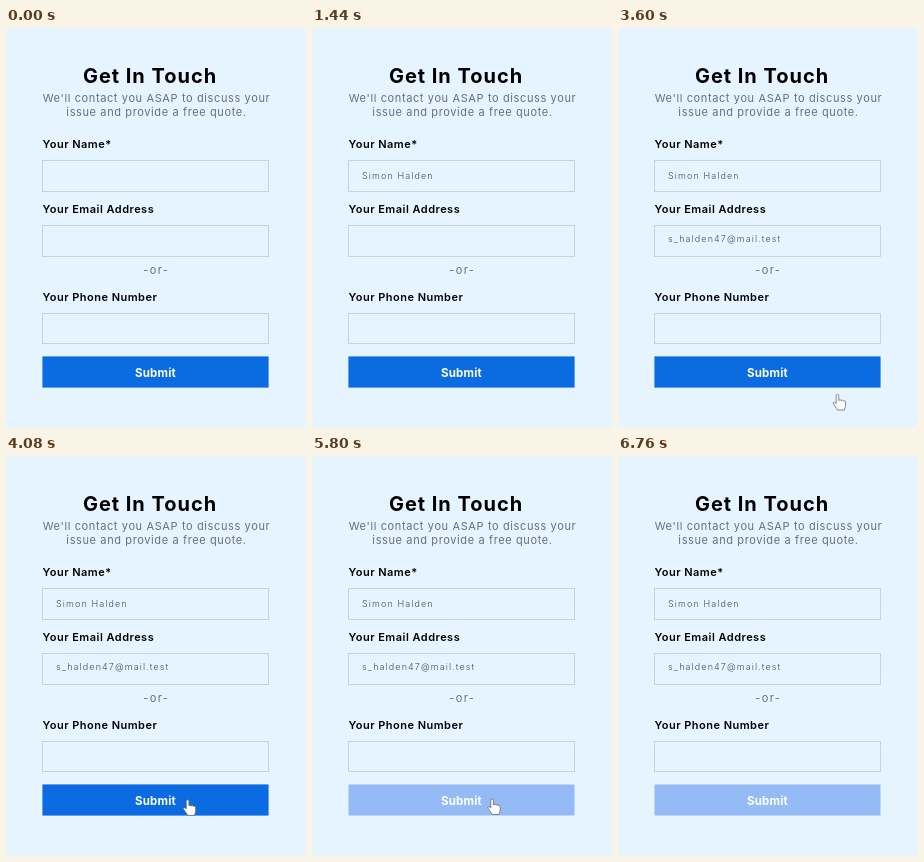
Animation of 300 by 400 pixels, one loop 7.24 s. Source, as an HTML page:

```html
<!DOCTYPE html>
<html lang="en">
<head>
<meta charset="utf-8">
<title>Contact form</title>
<style>
  html, body { margin: 0; width: 100%; height: 100%; overflow: hidden; background: #e5f4ff; }
  svg { display: block; width: 300px; height: 400px; font-family: Inter, "Open Sans", sans-serif; }
  .mid { text-anchor: middle; }
  .title { font-size: 20px; font-weight: 700; letter-spacing: .97px; }
  .note { font-size: 11px; letter-spacing: .62px; fill: #696e84; }
  .or { letter-spacing: 1.4px; }
  .label { font-size: 11px; font-weight: 600; letter-spacing: .48px; }
  .entry { font-size: 9px; font-weight: 300; letter-spacing: 1.1px; fill: #484f5c; }
  .field { fill: none; stroke: #c2d3e2; }
  .submit { font-size: 11.5px; font-weight: 700; letter-spacing: .2px; fill: #fff; }
</style>
</head>
<body>
<svg viewBox="0 0 300 400">
  <text class="title mid" x="144" y="55">Get In Touch</text>
  <text class="note mid" x="150.5" y="74">We'll contact you ASAP to discuss your</text>
  <text class="note mid" x="150.5" y="88">issue and provide a free quote.</text>

  <text class="label" x="36.5" y="120">Your Name*</text>
  <rect class="field" x="36.5" y="132.5" width="226" height="31"/>
  <text class="entry" id="name" x="50" y="151"></text>

  <text class="label" x="36.5" y="185">Your Email Address</text>
  <rect class="field" x="36.5" y="197.5" width="226" height="31"/>
  <text class="entry" id="email" x="50" y="214"></text>

  <text class="note or mid" x="150.3" y="246">-or-</text>

  <text class="label" x="36.5" y="273">Your Phone Number</text>
  <rect class="field" x="36.5" y="285.5" width="226" height="30"/>

  <rect x="36.5" y="328.5" width="226" height="31" fill="#94bbf6"/>
  <rect id="active" x="36.5" y="328.5" width="226" height="31" fill="#0a6ce0"/>
  <text class="submit mid" x="149.5" y="349">Submit</text>

  <path id="hand" fill="#fff" stroke="#5c616b" stroke-width=".75" stroke-linejoin="round"
    d="M-3.2 1V-6.3a1.3 1.3 0 0 1 2.6 0V-1.5c.4-1 2.2-1 2.5.2c.5-.8 2-.7 2.3.4c.6-.6 2-.3 2 1V3.5c0 1.8-1 2.5-1.2 4.5H-2c-.4-2-2-3-4-6.3c-.8-1.6 1-2.2 2.8-.2z"/>
</svg>
<script>
  const LOOP = 7240, TICK = 40;
  const NAME = "Simon Halden", EMAIL = "s_halden47@mail.test";
  const REST = [182, 350.5], ENTRY = [280, 409], EXIT = [285, 412];
  const [name, email, active, hand] =
    ["name", "email", "active", "hand"].map(id => document.getElementById(id));

  const clamp = (v, lo, hi) => Math.min(hi, Math.max(lo, v));
  const progress = (t, from, to) => clamp((t - from) / (to - from), 0, 1);
  const typed = (t, start, step, count) => clamp(Math.floor((t - start) / step) + 1, 0, count);

  function handPlace(t) {
    const [edge, p] = t < 5000
      ? [ENTRY, (1 - progress(t, 3400, 4600)) ** 5]
      : [EXIT, progress(t, 5760, 6760) ** 3];
    return REST.map((v, i) => v + (edge[i] - v) * p);
  }

  function draw(t) {
    // first letter, rest of the first name, space, last name
    const letters = typed(t, 240, 1, 1) + typed(t, 400, 106, 4)
      + typed(t, 800, 1, 1) + typed(t, 880, 112, 6);
    name.textContent = NAME.slice(0, letters);
    email.textContent = EMAIL.slice(0, typed(t, 1880, 75.7, EMAIL.length));
    active.setAttribute("opacity", 1 - progress(t, 5360, 5600));
    hand.setAttribute("transform", `translate(${handPlace(t)})`);
    hand.setAttribute("visibility", t > 3400 && t < 6760 ? "visible" : "hidden");
  }

  const begin = performance.now();
  function frame() {
    const t = (performance.now() - begin) % LOOP;
    draw(Math.floor(t / TICK) * TICK);
    requestAnimationFrame(frame);
  }
  frame();
</script>
</body>
</html>
```
